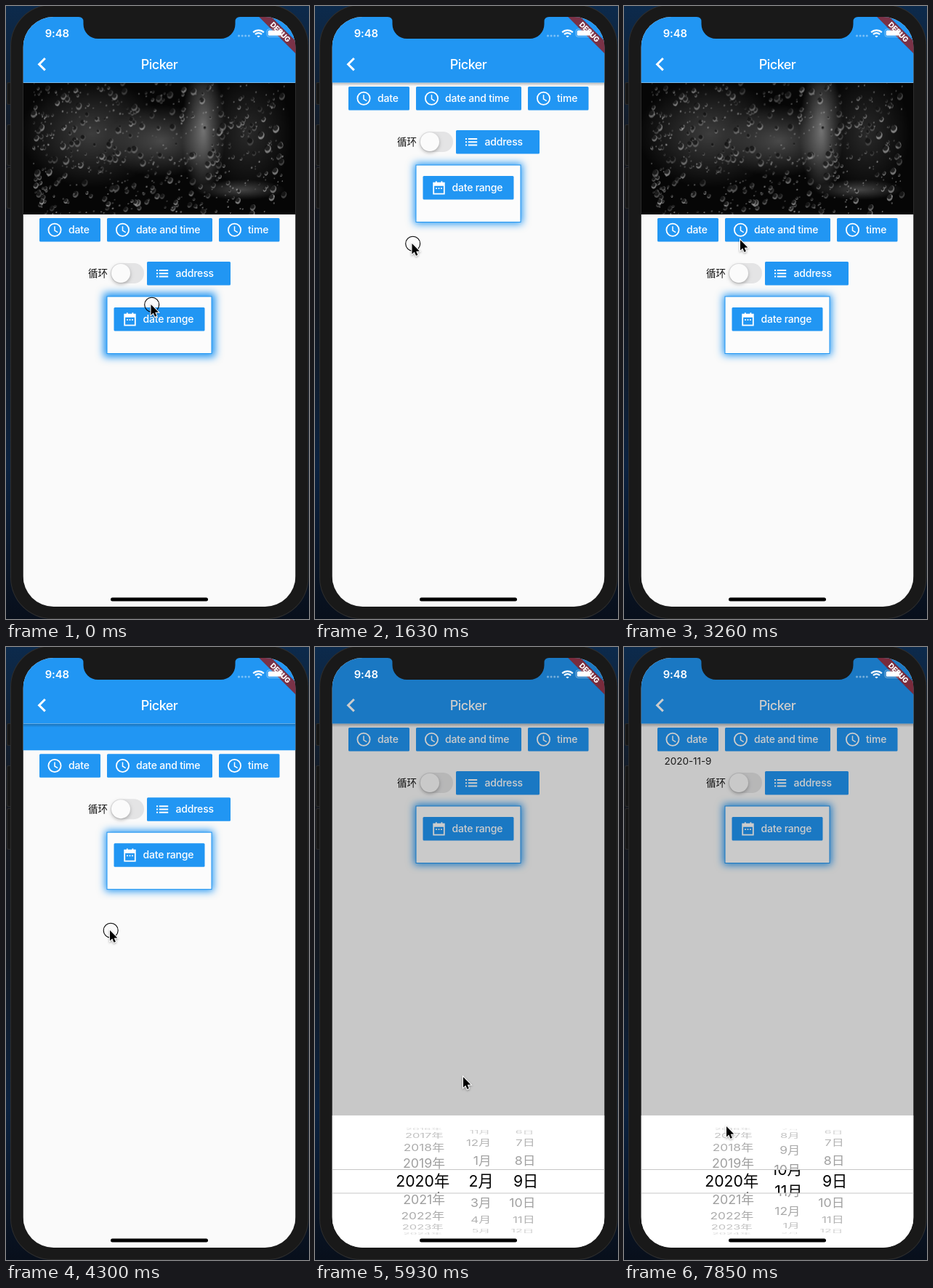
Recreate the animation shown at these times as an HTML page with a canvas. Size 417 by 844 pixels, loop 8000 ms.

```html
<!DOCTYPE html>
<html lang="en">
<head>
<meta charset="utf-8">
<title>Picker</title>
<style>
html, body { margin: 0; width: 100%; height: 100%; overflow: hidden; background: #0c1522; }
canvas { display: block; width: 417px; height: 844px; }
</style>
</head>
<body>
<canvas id="stage"></canvas>
<script>
const W = 417, H = 844, LOOP = 8000, STEPS = 54, STEP = LOOP / STEPS;
const LEFT = 23.5, TOP = 15, WIDE = 375, TALL = 812;
const BAR = 105.5, FLOOR = 181, SHEET = 182;
const BLUE = '#2196f3', BEZEL = '#191919';
const FONT = 'Inter, "Noto Sans CJK SC", "Noto Sans CJK", sans-serif';

const canvas = document.getElementById('stage');
const dpr = window.devicePixelRatio || 1;
canvas.width = W * dpr;
canvas.height = H * dpr;
const ctx = canvas.getContext('2d');

// Timing helpers: progress from a to b, plain and eased
const clamp = v => Math.max(0, Math.min(1, v));
const ramp = (t, a, b) => clamp((t - a) / (b - a));
const smooth = (t, a, b) => { const p = ramp(t, a, b); return p * p * (3 - 2 * p); };
const settle = (t, a, b) => 1 - (1 - ramp(t, a, b)) ** 2;

const pullAt = t => FLOOR * (1 - ramp(t, 1040, 1620) + ramp(t, 2100, 2815) - ramp(t, 3704, 4444));
const monthAt = t => 2 + 4 * settle(t, 6370, 6960) + 5 * settle(t, 7111, 8170);
const sheetAt = t => smooth(t, 5185, 5635);
const dimAt = t => 0.2 * ramp(t, 5185, 5505);

// Hand path: time, x, y, pressed until the next point
const PATH = [
  [0, 199, 411, 1], [140, 199, 411, 0], [400, 199, 411, 0], [1040, 150, 560, 1],
  [1630, 133, 327, 0], [2100, 133, 327, 1], [2815, 141, 655, 0], [3259, 159.5, 322, 0],
  [3704, 85, 606, 1], [4296, 142.5, 390, 1], [4889, 104, 93, 0], [5030, 101, 117, 1],
  [5190, 101, 117, 0], [5333, 101, 117, 0], [5926, 203.5, 592, 0], [6370, 236, 772, 0]
];
const STROKE = 741, SWIPES = 6370, SWIPES_END = 7480;

function handAt(t) {
  if (t >= SWIPES) {
    const turn = (Math.min(t, SWIPES_END) - SWIPES) / STROKE;
    const away = smooth(t, SWIPES_END, 7852);
    const y = 727 + 45 * Math.cos(turn * 2 * Math.PI);
    return [236 - 95.5 * away, y + (660 - y) * away, turn % 1 < 0.45 && !away];
  }
  const i = PATH.findIndex(k => k[0] > t);
  const b = PATH[i < 0 ? PATH.length - 1 : i], a = PATH[i < 0 ? PATH.length - 1 : i - 1];
  const p = smooth(t, a[0], b[0]) || 0;
  return [a[1] + (b[1] - a[1]) * p, a[2] + (b[2] - a[2]) * p, a[3]];
}

function box(x, y, w, h, r, fill, c = ctx) {
  c.fillStyle = fill;
  c.beginPath();
  c.roundRect(x, y, w, h, r);
  c.fill();
}

function line(points, width, color) {
  ctx.strokeStyle = color;
  ctx.lineWidth = width;
  ctx.beginPath();
  points.forEach(([x, y]) => ctx.lineTo(x, y));
  ctx.stroke();
}

function ring(x, y, r, width, color) {
  ctx.strokeStyle = color;
  ctx.lineWidth = width;
  ctx.beginPath();
  ctx.arc(x, y, r, 0, 7);
  ctx.stroke();
}

function shadow(color, blur, dy = 0) {
  ctx.shadowColor = color;
  ctx.shadowBlur = blur * dpr;
  ctx.shadowOffsetY = dy * dpr;
}

function label(s, x, y, size, weight, color, align = 'left', spacing = 0) {
  ctx.font = `${weight} ${size}px ${FONT}`;
  ctx.letterSpacing = spacing + 'px';
  ctx.textAlign = align;
  ctx.fillStyle = color;
  ctx.fillText(s, x, y);
}

function fade(y0, y1, colors) {
  const g = ctx.createLinearGradient(0, y0, 0, y1);
  colors.forEach((c, i) => g.addColorStop(i / (colors.length - 1), c));
  return g;
}

// Rain on dark glass: soft light patches under seeded drops
function makePhoto() {
  const c = document.createElement('canvas');
  c.width = WIDE * dpr;
  c.height = FLOOR * dpr;
  const p = c.getContext('2d');
  p.scale(dpr, dpr);
  box(0, 0, WIDE, FLOOR, 0, '#060606', p);
  const patch = (x, y, rx, ry, v) => {
    p.save();
    p.translate(x, y);
    p.scale(rx, ry);
    const g = p.createRadialGradient(0, 0, 0, 0, 0, 1);
    g.addColorStop(0, `rgba(${v},${v},${v},.8)`);
    g.addColorStop(1, `rgba(${v},${v},${v},0)`);
    box(-1, -1, 2, 2, 0, g, p);
    p.restore();
  };
  patch(95, 70, 100, 75, 75);
  patch(190, 80, 75, 50, 90);
  patch(248, 65, 30, 90, 140);
  patch(310, 70, 60, 85, 50);
  patch(300, 147, 60, 14, 85);

  let seed = 17;
  const rnd = () => (seed = seed * 16807 % 2147483647) / 2147483647;
  const oval = (x, y, rx, ry, fill) => {
    p.fillStyle = fill;
    p.beginPath();
    p.ellipse(x, y, rx, ry, 0.4, 0, 7);
    p.fill();
  };
  for (let i = 0; i < 650; i++) {
    const x = 15 + 345 * rnd() ** 1.3, y = FLOOR * rnd();
    const r = 0.8 + 3.4 * rnd() ** 3, v = 80 + 110 * rnd() | 0;
    oval(x, y, r, r * 1.3, `rgba(${v},${v},${v},.65)`);
    if (r > 1.2) oval(x - r * 0.2, y - r * 0.4, r * 0.85, r * 0.9, 'rgba(12,12,12,.8)');
  }
  return c;
}
const photo = makePhoto();

function clock(x, y) {
  ring(x, y, 8.6, 1.8, '#fff');
  line([[x, y - 5], [x, y + 0.8], [x + 4.2, y + 3.3]], 1.5, '#fff');
}

function listIcon(x, y) {
  for (const d of [-4.2, 0, 4.2]) {
    box(x, y + d - 1, 2, 2, 0, '#fff');
    box(x + 3.8, y + d - 1, 12.4, 2, 0, '#fff');
  }
}

function calendar(x, y) {
  ctx.strokeStyle = '#fff';
  ctx.lineWidth = 1.8;
  ctx.strokeRect(x - 7.3, y - 6.7, 14.6, 15);
  box(x - 7.3, y - 6.7, 14.6, 4.2, 0, '#fff');
  for (const d of [-4.6, 3]) box(x + d, y - 9, 1.8, 3, 0, '#fff');
  for (const d of [-4.4, -0.9, 2.6]) box(x + d, y, 1.8, 1.8, 0, '#fff');
}

function button(x, y, w, text, textX, icon, iconX) {
  box(x, y, w, 32.5, 1.5, BLUE);
  icon(iconX, y + 16.3);
  label(text, textX, y + 21.3, 14, 500, '#fff', 'left', -0.2);
}

function ripple(t, y) {
  const p = (t - 5180) / 300;
  if (p < 0 || p > 1.4) return;
  ctx.save();
  ctx.beginPath();
  ctx.rect(46, y, 84, 32.5);
  ctx.clip();
  ctx.fillStyle = `rgba(255,255,255,${0.13 * clamp(2 - p * 1.4)})`;
  ctx.beginPath();
  ctx.arc(101, y + 8, 10 + 38 * p, 0, 7);
  ctx.fill();
  ctx.restore();
}

function card(y, spread) {
  ctx.save();
  // Only the shadow of this offstage box is seen
  shadow(BLUE, 11);
  ctx.shadowOffsetX = 2 * W * dpr;
  box(139 - 2 * W - spread, y - spread, 144 + 2 * spread, 78.5 + 2 * spread, 2, BLUE);
  ctx.restore();
  box(139, y, 144, 78.5, 0, '#fcfcfc');
  ctx.strokeStyle = BLUE;
  ctx.lineWidth = 1;
  ctx.strokeRect(139, y, 144, 78.5);
  button(148.5, y + 15, 125, 'date range', 188.5, calendar, 170.5);
}

function toggle(y) {
  box(144, y, 46, 28, 14, '#e4e4e5');
  ctx.save();
  shadow('rgba(0,0,0,.28)', 5, 2);
  box(145, y + 1, 26, 26, 13, '#fbfbfb');
  ctx.restore();
}

function page(t, pull, month) {
  box(LEFT, TOP, WIDE, TALL, 0, '#fafafa');
  if (pull > 0) {
    ctx.save();
    ctx.beginPath();
    ctx.rect(LEFT - 1, BAR, WIDE + 2, pull + 0.5);
    ctx.clip();
    const open = clamp((pull - 50) / 80);
    if (open < 1) box(LEFT, BAR, WIDE, FLOOR, 0, BLUE);
    ctx.globalAlpha = open;
    ctx.drawImage(photo, LEFT - 0.5, BAR, WIDE + 1, FLOOR + 0.5);
    ctx.restore();
  }
  const y = 111 + pull;
  button(46, y, 84, 'date', 86, clock, 67);
  ripple(t, y);
  button(139, y, 145, 'date and time', 179, clock, 160.5);
  button(293, y, 83.5, 'time', 333, clock, 314.5);
  if (month >= 2.5) label(`2020-${Math.round(month)}-9`, 88, y + 50.5, 13.6, 400, '#222', 'center', -0.1);
  label('循环', 113, y + 81, 13.5, 400, '#111');
  toggle(y + 62);
  button(194, y + 60, 115, 'address', 233.5, listIcon, 207);
  card(y + 108, t < 440 ? 5 : 2.5);

  box(LEFT, BAR, WIDE, 5, 0, fade(BAR, BAR + 5, ['rgba(0,0,0,.26)', 'rgba(0,0,0,0)']));
  box(LEFT, TOP, WIDE, BAR - TOP, 0, BLUE);
  line([[53.8, 72], [45.6, 80.2], [53.8, 88.4]], 3, '#fff');
  label('Picker', 211, 87, 18, 500, '#fff', 'center', -0.5);
}

// One wheel column; angle is the turn per item in radians
function wheel(top, xc, right, angle, radius, pos, text) {
  const mid = top + 91, lineA = top + 74.5, lineB = top + 107;
  const draw = (zoom, color, ...bands) => {
    ctx.save();
    ctx.beginPath();
    bands.forEach(([a, b]) => ctx.rect(xc - 60, a, 120, b - a));
    ctx.clip();
    const base = Math.round(pos);
    for (let n = base - 4; n <= base + 4; n++) {
      const th = (n - pos) * angle, cos = Math.cos(th);
      if (Math.abs(th) > 1.5) continue;
      ctx.save();
      ctx.translate(xc, mid + radius * Math.sin(th));
      ctx.scale(zoom * (1 - 0.17 * (1 - cos)), zoom * cos);
      label(text(n), right - xc, 6.3, 18, 400, color(cos), 'right');
      ctx.restore();
    }
    ctx.restore();
  };
  draw(1, cos => `rgba(0,0,0,${0.1 + 0.3 * cos})`, [top, lineA], [lineB, top + SHEET]);
  draw(1.18, () => '#000', [lineA, lineB]);
}

function sheet(shown, month) {
  if (shown <= 0) return;
  const top = TOP + TALL - SHEET * shown, deg = Math.PI / 180;
  box(LEFT, top, WIDE, SHEET + 1, 0, '#fff');
  wheel(top, 148, 179.5, 20 * deg, 73, 2020, n => n + '年');
  wheel(top, 228, 243, 24 * deg, 71.5, month, n => (n + 11) % 12 + 1 + '月');
  wheel(top, 284, 303.8, 24 * deg, 71.5, 9, n => n + '日');
  for (const d of [74.5, 107]) line([[LEFT, top + d], [LEFT + WIDE, top + d]], 1, '#c6c6c6');
}

function statusBar() {
  const faint = 'rgba(255,255,255,.4)';
  label('9:48', 70.3, 42.8, 14.8, 600, '#fff', 'center', -0.1);
  for (let i = 0; i < 4; i++) box(319 + i * 4.6, 39.6, 3, 3, 1.5, faint);
  ctx.save();
  ctx.beginPath();
  ctx.moveTo(347.5, 43.5);
  ctx.arc(347.5, 43.5, 14, -2.36, -0.78);
  ctx.clip();
  for (const r of [10.2, 6.3, 1.7]) ring(347.5, 43.5, r, 2.3, '#fff');
  ctx.restore();
  ctx.strokeStyle = faint;
  ctx.lineWidth = 1;
  ctx.beginPath();
  ctx.roundRect(359, 31.8, 22, 10.6, 3);
  ctx.stroke();
  box(360.7, 33.4, 18.6, 7.4, 1.6, '#fff');
  box(382.3, 35.3, 1.4, 3.8, 0.7, faint);
}

function ribbon() {
  ctx.save();
  ctx.translate(LEFT + WIDE, TOP);
  ctx.rotate(Math.PI / 4);
  box(-50, 23.5, 100, 12, 0, 'rgba(0,0,0,.4)');
  box(-50, 23.5, 100, 12, 0, 'rgba(183,28,28,.63)');
  label('DEBUG', 0, 33, 10, 800, '#fff', 'center', -0.1);
  ctx.restore();
}

function notch() {
  ctx.fillStyle = BEZEL;
  ctx.beginPath();
  ctx.moveTo(100, 14);
  ctx.lineTo(100, 15);
  ctx.quadraticCurveTo(106.5, 15, 106.5, 21.5);
  ctx.arcTo(106.5, 45, 130, 45, 20);
  ctx.arcTo(315.5, 45, 315.5, 21.5, 20);
  ctx.lineTo(315.5, 21.5);
  ctx.quadraticCurveTo(315.5, 15, 322, 15);
  ctx.lineTo(322, 14);
  ctx.fill();
}

function phone() {
  box(0, 0, W, H, 0, fade(0, H, ['#0c2a4c', '#15181f', '#121821', '#0b2240', '#080f1b']));
  for (const [y, h] of [[105, 31], [163, 57], [222, 57]]) {
    box(1, y, 8, h, 2, '#2a2a2a');
    box(2, y + 1, 7, h - 2, 2, '#171717');
  }
  box(6, -2, 410.5, 846, 57, '#2e2e2e');
  box(7, -1, 408.5, 844, 56, BEZEL);
}

function pointer(t) {
  const [x, y, pressed] = handAt(t);
  if (pressed) ring(x + 1.7, y + 0.2, 10, 1.1, '#000');
  ctx.save();
  ctx.translate(x, y);
  ctx.beginPath();
  [[0.5, 0], [0.5, 14.5], [3.8, 11.6], [6, 16.8], [8.4, 15.7], [6.2, 10.7], [10.8, 10.5]]
    .forEach(p => ctx.lineTo(...p));
  ctx.closePath();
  shadow('rgba(0,0,0,.35)', 3, 1.2);
  ctx.strokeStyle = '#fff';
  ctx.lineWidth = 2;
  ctx.stroke();
  ctx.shadowColor = 'transparent';
  ctx.fillStyle = '#000';
  ctx.fill();
  ctx.restore();
}

function render(t) {
  const month = monthAt(t);
  ctx.setTransform(dpr, 0, 0, dpr, 0, 0);
  phone();
  ctx.save();
  ctx.beginPath();
  ctx.roundRect(LEFT, TOP, WIDE, TALL, 42);
  ctx.clip();
  page(t, pullAt(t), month);
  box(LEFT, TOP, WIDE, TALL, 0, `rgba(0,0,0,${dimAt(t)})`);
  sheet(sheetAt(t), month);
  ribbon();
  statusBar();
  box(144, 814.5, 134, 5, 2.5, '#000');
  notch();
  ctx.restore();
  pointer(t);
}

const start = performance.now();
function tick() {
  const t = (performance.now() - start) % LOOP;
  render(Math.floor((t + 6) / STEP) % STEPS * STEP);
  requestAnimationFrame(tick);
}
tick();
</script>
</body>
</html>
```
